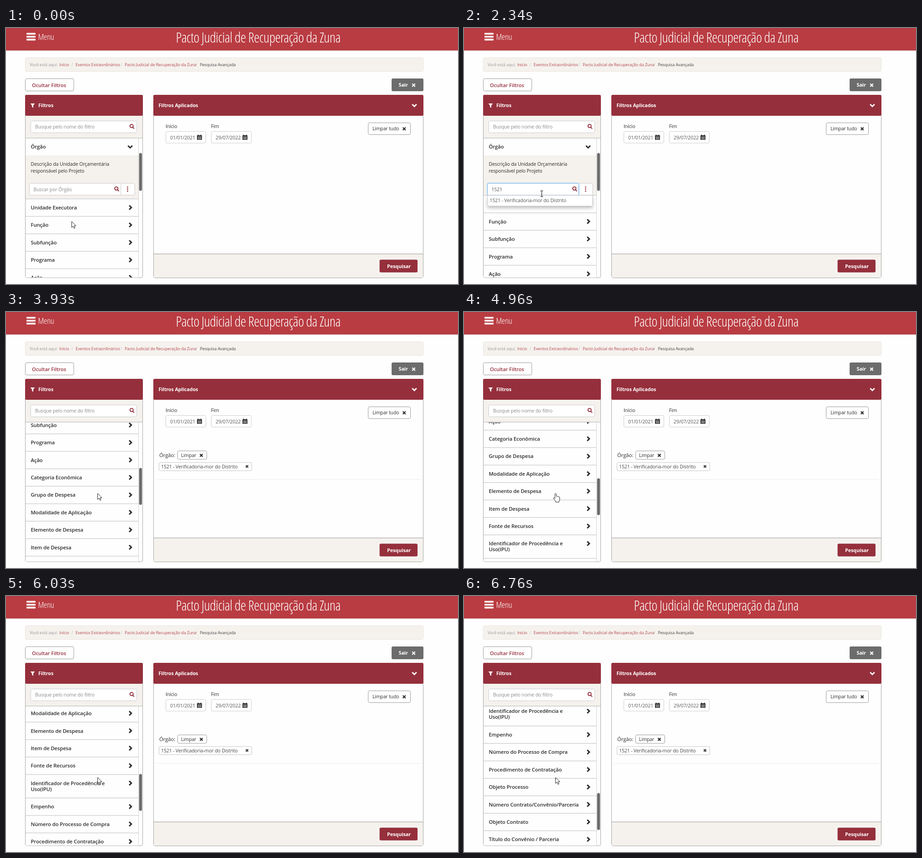
Write an HTML page that moves like this. It is 994x563 px and loops after 8 s.

```html
<!DOCTYPE html>
<html lang="pt-BR">
<head>
<meta charset="utf-8">
<title>Pesquisa Avançada</title>
<style>
  html, body { margin: 0; width: 100%; height: 100%; overflow: hidden; background: #fefefe; }
  svg { display: block; width: 994px; height: 563px; }
  text { font-family: "Open Sans", "Noto Sans", sans-serif; letter-spacing: -.01em; white-space: pre; }
  .thin { font-family: "Open Sans", "Roboto", sans-serif; font-stretch: 75%; font-weight: 300; letter-spacing: -.02em; }
</style>
</head>
<body>
<script>
const NS = 'http://www.w3.org/2000/svg';
const WINE = '#952f3c', DARK = '#2b2b2b', GRAY = '#555', CREAM = '#f5f2ee', LINE = '#d2d2d2', EDGE = '#a5a5a5';
const ORGAN = '1521 - Verificadoria-mor do Distrito';
const LOOP = 8000, ROW = 38.4;

function add(parent, tag, attrs = {}) {
  const node = document.createElementNS(NS, tag);
  for (const key in attrs) node.setAttribute(key, attrs[key]);
  parent.append(node);
  return node;
}
const group = parent => add(parent, 'g');
const show = (node, on) => node.setAttribute('visibility', on ? 'inherit' : 'hidden');
const move = (node, x, y) => node.setAttribute('transform', `translate(${x} ${y})`);

// Box given by its outer edges; a stroke is drawn inside them.
function box(parent, x1, y1, x2, y2, fill, stroke, rx = 0) {
  const inset = stroke ? .5 : 0;
  return add(parent, 'rect', {
    x: x1 + inset, y: y1 + inset, width: x2 - x1 - 2 * inset, height: y2 - y1 - 2 * inset,
    fill, stroke: stroke || 'none', rx
  });
}
// Text placed by its left edge and the middle of its capitals.
function label(parent, x, middle, string, size = 10.5, fill = GRAY, weight = 400) {
  const node = add(parent, 'text', { x, y: middle + size * .36, 'font-size': size, fill, 'font-weight': weight });
  node.textContent = string;
  return node;
}
function icon(parent, x, y, d, stroke, width) {
  return add(parent, 'path', { d, stroke, fill: 'none', 'stroke-width': width, transform: `translate(${x} ${y})` });
}
const chevronRight = (p, x, y) => icon(p, x, y, 'M-3-4.6 1.7 0-3 4.6', DARK, 3);
const chevronDown = (p, x, y, color) => icon(p, x, y, 'M-4.8-2.3 0 2.5 4.8-2.3', color, 2.8);
const cross = (p, x, y, color, r = 3) => icon(p, x, y, `M${-r} ${-r} ${r} ${r}M${r} ${-r} ${-r} ${r}`, color, 2.3);
const lens = (p, x, y) => icon(p, x, y, 'M2.8-1A3.6 3.6 0 1 1-4.4-1 3.6 3.6 0 1 1 2.8-1M1.8 1.8 5 5', WINE, 1.9);

function calendar(parent, x, y) {
  const g = group(parent);
  move(g, x, y);
  box(g, 0, 1.5, 11, 11.5, DARK, null, 1);
  add(g, 'path', { d: 'M2.5 0V3M8.5 0V3', stroke: DARK, 'stroke-width': 1.8 });
  add(g, 'path', { d: 'M1 4.4H10M1 6.8H10M1 9.2H10M3.5 4.4V11M5.8 4.4V11M8.1 4.4V11', stroke: '#fff', 'stroke-width': .5 });
}
function chip(parent, x, y) {
  box(parent, x, y, x + 205, y + 19, '#fff', '#c4c4c4', 3);
  label(parent, x + 5, y + 9.3, ORGAN, 10.5, '#444');
  cross(parent, x + 194, y + 9.2, '#444', 2.6);
}

const svg = add(document.body, 'svg', { viewBox: '0 0 994 563' });
const defs = add(svg, 'defs');
box(add(defs, 'clipPath', { id: 'view' }), 43, 242, 300, 548.5, '#000');
const shade = add(defs, 'filter', { id: 'shade', x: '-10%', y: '-30%', width: '120%', height: '170%' });
add(shade, 'feDropShadow', { dx: 0, dy: 4, stdDeviation: 3.5, 'flood-opacity': .25 });

function drawPage() {
  box(svg, 0, 0, 994, 49, '#b93c42');
  box(svg, 0, 48, 994, 49.5, '#a93a40');
  [10.8, 17.2, 23.6].forEach(y => box(svg, 45, y, 65, y + 3.8, '#fff', null, 1));
  label(svg, 70.5, 19.5, 'Menu', 19, '#fff').setAttribute('class', 'thin');
  label(svg, 373.5, 20.5, 'Pacto Judicial de Recuperação da Zuna', 31.3, '#fff').setAttribute('class', 'thin');

  box(svg, 42, 65, 918, 96, CREAM, '#e9e3dc', 3);
  [[52, 'Você está aqui:', '#999'], [117, 'Início', '#b5484e'], [144, '/', '#bbb'],
   [153, 'Eventos Extraordinários', '#b5484e'], [252, '/', '#bbb'],
   [261, 'Pacto Judicial de Recuperação da Zuna', '#b5484e'], [417, '/', '#bbb'],
   [426.5, 'Pesquisa Avançada', '#444']].forEach(([x, s, color]) => label(svg, x, 80.3, s, 9, color));

  box(svg, 42, 111, 149.5, 139, '#fff', '#999', 3);
  label(svg, 57, 125.5, 'Ocultar Filtros', 11.2, WINE, 600);
  box(svg, 848, 111, 918, 139, '#6c6c6c', null, 3);
  label(svg, 863.5, 125.5, 'Sair', 10.9, '#fff', 700);
  cross(svg, 896.5, 125.7, '#fff', 3.2);

  box(svg, 42, 147, 301, 549.5, '#fefefe', EDGE, 3);
  box(svg, 42, 147, 301, 193, WINE, null, 3);
  add(svg, 'path', { d: 'M53.5 166H63.5L60 170V175.5L57 173.5V170Z', fill: '#fff' });
  label(svg, 71, 170, 'Filtros', 10.8, '#fff', 700);
  box(svg, 43, 193, 300, 242, CREAM);
  box(svg, 54, 204, 288, 231, '#fff', '#ccc', 3);
  label(svg, 64, 217.5, 'Busque pelo nome do filtro', 10.5, '#888');
  lens(svg, 277, 216.5);

  box(svg, 324, 147, 918, 550, '#fefefe', EDGE, 3);
  box(svg, 324, 147, 918, 193, WINE, null, 3);
  label(svg, 335.5, 170, 'Filtros Aplicados', 10.8, '#fff', 700);
  chevronDown(svg, 898, 170, '#fff');
  [[351, 'Início', '01/01/2021'], [451, 'Fim', '29/07/2022']].forEach(([x, name, date]) => {
    label(svg, x, 216.5, name, 10.5, DARK);
    box(svg, x, 227, x + 89, 253.5, '#fff', '#ccc', 3);
    label(svg, x + 10, 240.7, date, 10.6);
    calendar(svg, x + 69, 234.5);
  });
  box(svg, 796, 208, 890, 235, '#fff', '#999', 3);
  label(svg, 806, 221.7, 'Limpar tudo', 10.4, DARK);
  cross(svg, 875.7, 221.8, DARK);
  box(svg, 325, 497, 917, 549, CREAM);
  box(svg, 324, 496.3, 918, 497.5, EDGE);
  box(svg, 821.5, 509.5, 905, 537.5, WINE, null, 3);
  label(svg, 838, 523.7, 'Pesquisar', 10.9, '#fff', 700);
}

function drawApplied() {
  const g = group(svg);
  label(g, 337, 314.5, 'Órgão:', 11.4, DARK);
  box(g, 377, 305, 442, 324.5, '#fff', '#999', 3);
  label(g, 385, 315, 'Limpar', 10.3, DARK);
  cross(g, 429.5, 315.3, DARK);
  chip(g, 336, 330.5);
  box(g, 329, 367.6, 913, 368.6, '#ebebeb');
  return g;
}

function drawRows(parent) {
  const rows = group(parent);
  let y = 0;
  for (const name of ['Unidade Executora', 'Função', 'Subfunção', 'Programa', 'Ação', 'Categoria Econômica',
    'Grupo de Despesa', 'Modalidade de Aplicação', 'Elemento de Despesa', 'Item de Despesa', 'Fonte de Recursos',
    'Identificador de Procedência e|Uso(IPU)', 'Empenho', 'Número do Processo de Compra',
    'Procedimento de Contratação', 'Objeto Processo', 'Número Contrato/Convênio/Parceria', 'Objeto Contrato',
    'Título do Convênio / Parceria']) {
    const lines = name.split('|'), height = ROW + 13.2 * (lines.length - 1);
    box(rows, 43, y, 292, y + height, '#fefefe');
    box(rows, 43, y - .7, 292, y + .8, LINE);
    lines.forEach((line, i) => label(rows, 54.5, y + 19.2 + 13 * i, line, 11.35, DARK, 600));
    chevronRight(rows, 274, y + 19);
    y += height;
  }
  return rows;
}

// Options are filtered by what is typed; the heading only shows without a query.
const OPTIONS = [
  'Exibir Todos (20)', '1081 - Gabinete Legal do Distrito',
  '2431 - Instituto de Planejamento da|Comarca Intermunicipal de Monte Dourivo',
  '2441 - Conselho Supervisor de Sistemas de|Distribuicao de Energia e de Iluminacao|Noturna da Provincia de Orva',
  ORGAN, '1401 - Grupo de Vigilantes Rurais do'
];
function drawMenu(parent, query) {
  const g = group(parent);
  const back = box(g, 51.5, 367.5, 283, 391, '#fff', '#ccc', 2);
  back.setAttribute('filter', 'url(#shade)');
  let y = 368;
  OPTIONS.filter((s, i) => query ? i && s.split(' ')[0].includes(query) : true).forEach(option => {
    const lines = option.split('|'), heading = option === OPTIONS[0];
    lines.forEach((line, i) =>
      label(g, 56.5, y + 11.4 + 15.3 * i, line, heading ? 10.2 : 10.5, heading ? DARK : GRAY, heading ? 600 : 400));
    y += 7.7 + 15.3 * lines.length;
  });
  const long = y > 420;
  back.setAttribute('height', (long ? 560 : y + .5) - 368);
  if (long) box(g, 274.5, 369, 280.5, 412.5, '#6b6b6b', null, 3);
  return g;
}

drawPage();
const applied = drawApplied();
const view = add(svg, 'g', { 'clip-path': 'url(#view)' });
const list = group(view);
box(list, 43, 242, 292, 280, '#fefefe');
label(list, 54.5, 261.3, 'Órgão', 11.35, DARK, 600);
chevronDown(list, 273, 261, DARK);
box(list, 43, 280, 292, 420, CREAM);
label(list, 54.5, 299, 'Descrição da Unidade Orçamentária', 10.45, DARK);
label(list, 54.5, 314.3, 'responsável pelo Projeto', 10.45, DARK);
box(list, 51, 341, 283.5, 368, '#fff', '#ccc', 2);
box(list, 252, 341, 253, 368, '#ccc');
[350, 354.3, 358.6].forEach(y => box(list, 266, y - 1.2, 268.6, y + 1.3, WINE, null, .6));
const focus = group(list);
box(focus, 50, 340, 254, 369, 'none', '#cfe6f7', 3);
box(focus, 51, 341, 253, 368, '#fff', '#66afe9', 2);
lens(list, 243.5, 354);
const entry = label(list, 60.5, 355, '', 10.5);
const picked = group(list);
chip(picked, 52, 379);
const rows = drawRows(list);
const menus = Object.fromEntries(['', '1', '15', '152', '1521'].map(q => [q, drawMenu(list, q)]));
box(view, 291, 242, 292, 549, LINE);
box(svg, 43, 241.5, 300, 242.7, '#bdbdbd');
const thumb = box(svg, 292.7, 275, 299, 358, '#6b6b6b', null, 3);

const pointers = { arrow: group(svg), beam: group(svg), hand: group(svg) };
add(pointers.arrow, 'path', { d: 'M0 0V13.2L3.1 10.4 5.3 15.2 7.4 14.2 5.3 9.6H9.4Z', fill: '#fff', stroke: '#222' });
add(pointers.beam, 'path', { d: 'M-3-6.5H-1L0-5.5 1-6.5H3M0-5.5V5.5M-3 6.5H-1L0 5.5 1 6.5H3', fill: 'none', stroke: '#222', 'stroke-width': 1.2 });
add(pointers.hand, 'path', {
  d: 'M-1.5 11V1Q0-1 1.5 1V6.3Q3 5 4.2 6.8 5.8 5.8 6.8 7.6 8.8 7 9 9V13Q9 15 7.5 17V19H0V17L-5 11Q-4.5 8.5-1.5 11Z',
  fill: '#fff', stroke: '#222', 'stroke-linejoin': 'round'
});

// Each step names only what changes from its time on.
const steps = [
  { at: 0, pointer: 'arrow', x: 144.5, y: 425.5, open: false, query: '', chosen: false, scroll: 0 },
  { at: 130, x: 147, y: 410 },
  { at: 275, x: 151, y: 380 },
  { at: 420, pointer: 'beam', x: 154, y: 356 },
  { at: 565, open: true },
  { at: 1300, query: '1' },
  { at: 1450, query: '15' },
  { at: 1600, query: '152' },
  { at: 1750, query: '1521' },
  { at: 2340, x: 171, y: 364.5 },
  { at: 2480, pointer: 'hand', x: 174, y: 376 },
  { at: 2620, x: 175, y: 380 },
  { at: 2760, open: false, query: '', chosen: true, pointer: 'arrow', x: 182, y: 386 },
  { at: 2900, x: 201.5, y: 399 }
];
function scrollRun(start, end, count, from, to) {
  for (let i = 0; i < count; i++) steps.push({
    at: start + (end - start) * i / (count - 1), pointer: 'arrow',
    scroll: from + (to - from) * (i + 1) / count
  });
}
scrollRun(3200, 3930, 6, 0, 257);
scrollRun(4680, 4960, 3, 257, 342);
steps.at(-1).pointer = 'hand';
scrollRun(5260, 5410, 2, 342, 408);
scrollRun(6030, 6760, 6, 408, 598);

function render(time) {
  const now = Object.assign({}, ...steps.filter(step => step.at <= time));
  for (const q in menus) show(menus[q], now.open && q === now.query);
  show(focus, now.open);
  show(picked, now.chosen);
  show(applied, now.chosen);
  entry.textContent = now.query || 'Buscar por Órgão';
  entry.setAttribute('fill', now.query ? GRAY : '#888');
  move(rows, 0, now.chosen ? 409.8 : now.open ? 368.1 : 375.8);
  move(list, 0, -now.scroll);
  move(thumb, 0, now.scroll * .265);
  thumb.setAttribute('height', now.chosen ? 81 : 83);
  for (const kind in pointers) show(pointers[kind], kind === now.pointer);
  move(pointers[now.pointer], now.x, now.y);
}

const start = performance.now();
function tick() {
  render((performance.now() - start) % LOOP);
  requestAnimationFrame(tick);
}
tick();
</script>
</body>
</html>
```
